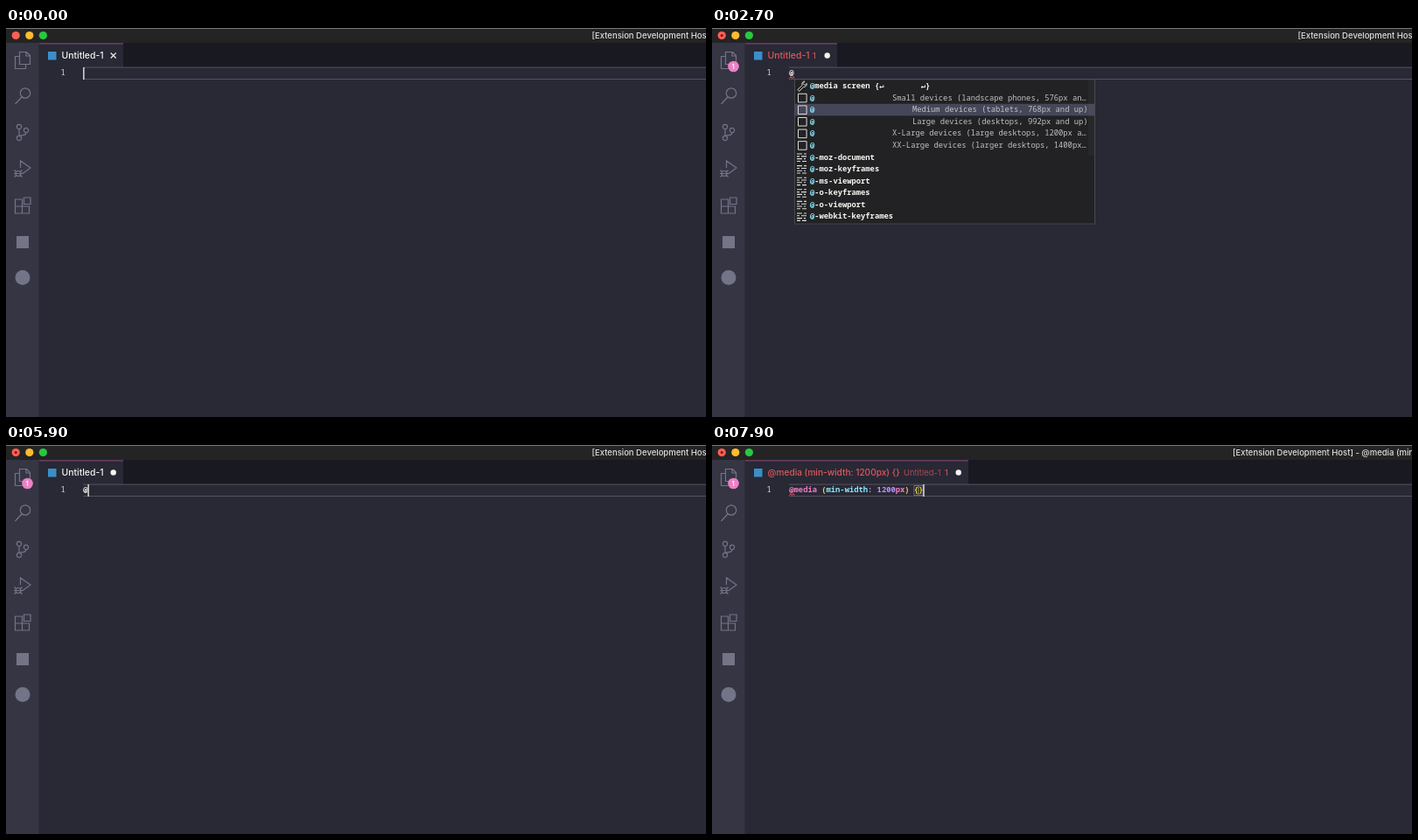
Recreate the animation shown at these times as an HTML page with a canvas. Size 800 by 445 pixels, loop 8000 ms.

```html
<!DOCTYPE html>
<html lang="en">
<head>
<meta charset="utf-8">
<title>Editor snippets</title>
<style>
html, body { margin: 0; width: 100%; height: 100%; overflow: hidden; background: #292835; }
canvas { display: block; }
</style>
</head>
<body>
<canvas id="stage" width="800" height="445"></canvas>
<script>
const ctx = document.getElementById('stage').getContext('2d');
const LOOP = 8000, CHAR = 5.28, ROW = 13.59, LIST_TOP = 59.6;
const MONO = '"Noto Sans Mono", "DejaVu Sans Mono", monospace';
const SANS = 'Inter, "Open Sans", sans-serif';
const WHITE = '#f4f4f0', RED = '#de595c', PINK = '#f07fc4', CYAN = '#8be9fd', YELLOW = '#f5d430',
  PURPLE = '#bd93f9', ICON = '#747488', EDITOR = '#292835';

// Each timeline lists [start time, value].
const typed = [[0, ''], [1200, '@'], [4000, '576'], [5500, ''], [5700, '@'], [7700, '1200']];
const picks = [[0, -1], [1400, 0], [2400, 1], [2700, 2], [3000, 3], [3500, 2], [3700, 1], [4000, -1],
  [6100, 1], [7000, 2], [7300, 3], [7500, 4], [7700, -1]];
const at = (line, t) => line.filter(e => e[0] <= t).pop();
const within = (t, a, b) => t >= a && t < b;

const items = [
  ['media screen {↵        ↵}', 'Emmet Abbreviation'],
  ['', 'Small devices (landscape phones, 576px an…'],
  ['', 'Medium devices (tablets, 768px and up)'],
  ['', 'Large devices (desktops, 992px and up)'],
  ['', 'X-Large devices (large desktops, 1200px a…'],
  ['', 'XX-Large devices (larger desktops, 1400px…'],
  ...['-moz-document', '-moz-keyframes', '-ms-viewport', '-o-keyframes', '-o-viewport',
    '-webkit-keyframes', 'charset'].map(s => [s])
];

function rect(x, y, w, h, color) {
  ctx.fillStyle = color;
  ctx.fillRect(x, y, w, h);
}
function dot(x, y, r, color) {
  ctx.fillStyle = color;
  ctx.beginPath();
  ctx.arc(x, y, r, 0, 7);
  ctx.fill();
}
function stroke(path, color, width = 1) {
  ctx.strokeStyle = color;
  ctx.lineWidth = width;
  ctx.stroke(new Path2D(path));
}
function text(s, x, y, color, size, font = SANS, weight = 400) {
  ctx.font = `${weight} ${size}px ${font}`;
  ctx.fillStyle = color;
  ctx.fillText(s, x, y);
}
const mono = (s, x, y, color, weight = 600) => text(s, x, y, color, 8.8, MONO, weight);
const ring = (x, y, r) => `M${x - r} ${y}a${r} ${r} 0 1 0 ${2 * r} 0a${r} ${r} 0 1 0 ${-2 * r} 0`;

function activityBar(badge) {
  rect(0, 17, 37.5, 428, '#353544');
  const icons = [
    'M15.5 27.5h8l4 4v10h-12zM23 27.5v4.5h4.5M15.5 32.5h-5v14h12v-5',
    ring(22, 74.5, 5.7) + 'M18 79L10.5 87',
    ring(15, 113, 2.6) + ring(23, 117, 2.6) + ring(15, 126, 2.6) + 'M15 115.6v7.8M23 119.6q0 3-4 3q-4 0-4 1',
    'M16.5 160v-8l11.5 8l-9 6.5' + ring(14, 166.5, 3) + 'M11 166.5h6M9.5 162.5l2 2M9 166.5h2M9.5 170.5l2-2M18.5 162.5l-2 2M17 166.5h2M18.5 170.5l-2-2',
    'M10.5 196h8v16h-8zM10.5 204h16v8h-16M20.5 194h7.5v7.5h-7.5z'
  ];
  icons.forEach(d => stroke(d, ICON, 1.2));
  rect(12, 238, 14, 14, ICON);
  dot(19, 285.5, 8.5, ICON);
  if (badge) {
    dot(24.5, 44, 6.3, '#ee80c5');
    text('1', 22.6, 44.3, '#fff', 8, SANS, 500);
  }
}

function titleBar(value, media) {
  rect(0, 0, 800, 17, '#242425');
  rect(0, 0, 800, 1, '#7a7a7a');
  ['#ff5f57', '#febc2e', '#28c840'].forEach((c, i) => dot(11.2 + 15.6 * i, 8.5, 4.6, c));
  if (value) dot(11.2, 8.5, 1.5, '#7d0f0c');
  const name = media || 'Untitled-1';
  const x = media ? (value === '576' ? 597 : 595) : 669.5;
  text('[Extension Development Host] - ' + name, x, 8.8, '#dededf', 9.5, SANS, 500);
}

function tab(value, media, error) {
  const extra = value === '1200' ? 6 : 0;
  const right = (media ? 278 + extra : 134) + (error ? 9 : 0);
  const color = error ? RED : WHITE;
  rect(37.5, 17, 762.5, 28, '#191921');
  rect(37.5, 17, right - 37.5, 28, EDITOR);
  rect(37.5, 17.4, right - 37.5, 1, '#8d4a78');
  rect(48, 27, 9.5, 9.5, '#3b8fc9');
  text(media || 'Untitled-1', 63.6, 31.6, color, media ? 10.1 : 10.4, SANS, 450);
  if (media) {
    ctx.globalAlpha = 0.72;
    text('Untitled-1', 213 + extra, 32, color, 9.4);
    ctx.globalAlpha = 1;
  }
  if (error) text('1', right - (media ? 27 : 28), 32, RED, 9.2);
  const x = right - 11.3;
  if (value) dot(x, 31.5, 3.2, WHITE);
  else stroke(`M${x - 3} 28.5l6 6m0 -6l-6 6`, WHITE, 1.1);
}

function codeLine(value, media, squiggle, cursor) {
  stroke('M88 45.1H800M88 58.5H800', '#54525f');
  mono('1', 62.6, 51.7, '#d8d8d8', 500);
  let col = 0;
  const put = (s, color) => {
    mono(s, 88.3 + CHAR * col, 51.7, color);
    col += s.length;
  };
  if (media) {
    [['@media ', PINK], ['(', YELLOW], ['min-width', CYAN], [': ', PINK],
      [value, PURPLE], ['px', PINK], [') {}', YELLOW]].forEach(p => put(...p));
    for (let i = 1; i < 3; i++) {
      stroke(`M${88.3 + CHAR * (col - i)} 46.5h5v11h-5z`, '#8a8a80', 0.7);
    }
  } else put(value, WHITE);
  if (squiggle) stroke('M88.5 57.5l1.4-1.8l1.5 1.8l1.5-1.8l1.2 1.8', '#ff5555', 1);
  if (cursor) rect(88.2 + CHAR * col, 45, 1.3, 14, WHITE);
}

function itemIcon(index, y) {
  if (index === 0) {
    stroke(`M98 ${y + 4}l5-5q-1-4 3-4.5l-2 2.5l2 2l2.3-2q.2 4-3.8 4l-5 5z`, '#d8d8d8', 1);
  } else if (index < 6) {
    stroke(`M98.5 ${y - 4.8}h9.6v9.6h-9.6z`, '#dcdcdc', 1);
  } else {
    stroke(`M97 ${y - 4}h6m2 0h3M97 ${y - 1.2}h3m2 0h6M97 ${y + 1.6}h6m2 0h2M97 ${y + 4.4}h4m2 0h5`, '#dcdcdc', 1.1);
  }
}

function popup(pick, scroll, thumb) {
  rect(94, 58.5, 344, 166, '#4a4a4c');
  rect(95, 59.3, 342, 164.3, '#222224');
  for (let row = 0; row < 12; row++) {
    const index = row + scroll, [label, detail] = items[index];
    const top = LIST_TOP + ROW * row, y = top + 6.9;
    if (index === pick) rect(95, top, 342, ROW, '#454759');
    itemIcon(index, y);
    mono('@', 112, y, CYAN, 700);
    mono(label, 112 + CHAR, y, WHITE, 700);
    // The abbreviation's detail shows only while it is picked.
    if (detail && (index > 0 || pick === 0)) {
      const end = detail.endsWith('…') ? 427.8 : 429.6;
      mono(detail, end - CHAR * detail.length, y, '#c2c2c4', 500);
    }
  }
  rect(430, 59.3 + 7.2 * scroll, 7.5, 86.5, `rgba(121,121,121,${0.5 * thumb})`);
}

function draw(t) {
  const [since, value] = at(typed, t);
  const pick = at(picks, t)[1];
  const media = value > '@' || value.length < 2 ? '' : `@media (min-width: ${value}px) {}`;
  const error = within(t, 1700, 4700) || t >= 6300;
  const squiggle = within(t, 1700, 4400) || t >= 6300;
  const blink = Math.floor((t - since) / 500) % 2 === 0;
  const scroll = t > 5000 ? 1 : 0;
  const fade = Math.min(1, Math.max(0, 1 - (t - (scroll ? 7300 : 2000)) / 800));

  ctx.textBaseline = 'middle';
  rect(0, 0, 800, 445, EDITOR);
  titleBar(value, media);
  tab(value, media, error);
  activityBar(t >= 1500);
  codeLine(value, media, squiggle, blink);
  if (pick >= 0) popup(pick, scroll, fade);
}

const start = performance.now();
function tick() {
  draw((performance.now() - start) % LOOP);
  requestAnimationFrame(tick);
}
tick();
</script>
</body>
</html>
```
